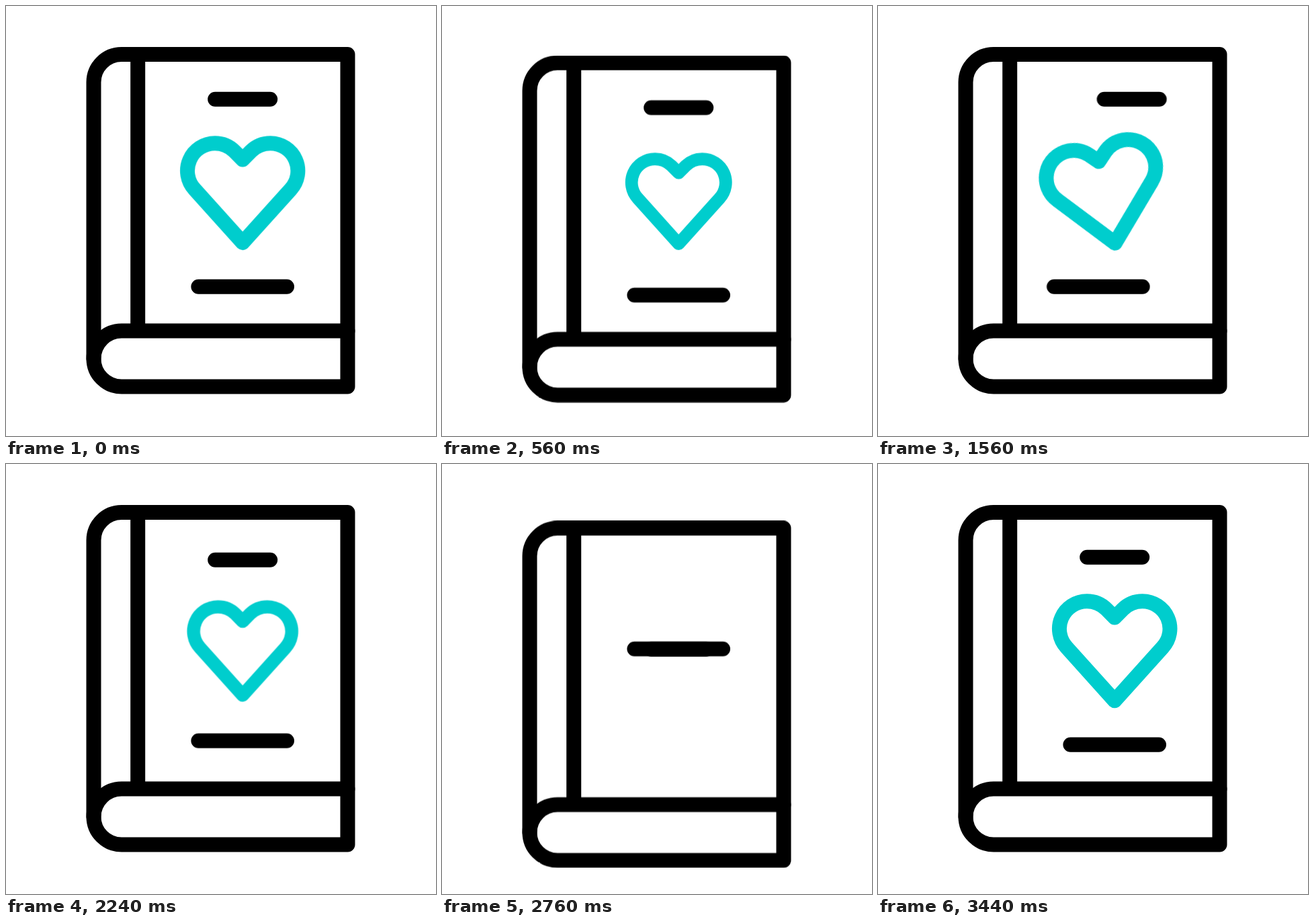
Write an HTML page that moves like this. It is 640x640 px and loops after 4 s.

```html
<!DOCTYPE html>
<html lang="en">
<head>
<meta charset="utf-8">
<title>Book with heart</title>
<style>
  html, body { margin: 0; width: 100%; height: 100%; overflow: hidden; background: #fff; }
  svg { display: block; width: 100vw; height: 100vh; }
  g, path {
    fill: none;
    stroke-width: 22;
    stroke-linecap: round;
    stroke-linejoin: round;
    animation: 4s cubic-bezier(.333, 0, .667, 1) infinite;
  }
  .book { stroke: #000; animation-name: dip; }
  .title { animation-name: title; }
  .author { animation-name: author; }
  .tilt { stroke: #00cdcd; transform-origin: 355.5px 349.5px; animation-name: tilt; }
  .heart { transform-origin: 352.2px 278.3px; animation-name: beat; animation-timing-function: linear; }

  @keyframes dip {
    0%, 18.33%, 57.63%, 75.95%, 100% { transform: translateY(0); }
    9.13%, 66.75% { transform: translateY(27.7px); }
  }
  @keyframes title {
    0%, 20%, 51%, 55%, 82.5%, 100% { transform: translate(0, 0); }
    28% { transform: translate(-59.5px, 0); }
    43% { transform: translate(43.3px, 0); }
    64.13%, 73.38% { transform: translate(0, 113.4px); }
  }
  @keyframes author {
    0%, 20%, 51%, 55%, 82.5%, 100% { transform: translate(0, 0); }
    28% { transform: translate(52.5px, 0); }
    43% { transform: translate(-40.5px, 0); }
    64.13%, 73.38% { transform: translate(0, -166px); }
  }
  @keyframes tilt {
    0%, 20%, 51%, 100% { transform: rotate(0deg); }
    28% { transform: rotate(15.4deg); }
    42% { transform: rotate(-14.8deg); }
  }
  @keyframes beat {
    0%, 18.33%, 55%, 85.9%, 100% { transform: scale(1); }
    9.13% { transform: scale(.683); }
    64.13%, 76.7% { transform: scale(0); }
  }
</style>
</head>
<body>
<svg viewBox="0 0 640 640">
  <g class="book">
    <path d="M508.5 72H172A41.5 41.5 0 0 0 130.5 113.5V525A41.5 41.5 0 0 0 172 566.5H508.5Z"/>
    <path d="M508.5 483.5H172A41.5 41.5 0 0 0 130.5 525M196.2 72V483.5"/>
    <path class="title" d="M311.2 138.7H393.2"/>
    <path class="author" d="M286.4 417.8H418"/>
    <g class="tilt">
      <path class="heart" d="M352.2 352.3L280.8 273A41 41 0 0 1 310.8 204.2A41 41 0 0 1 339.8 216L352.2 228.5L364.6 216A41 41 0 0 1 393.6 204.2A41 41 0 0 1 423.6 273Z"/>
    </g>
  </g>
</svg>
</body>
</html>
```
